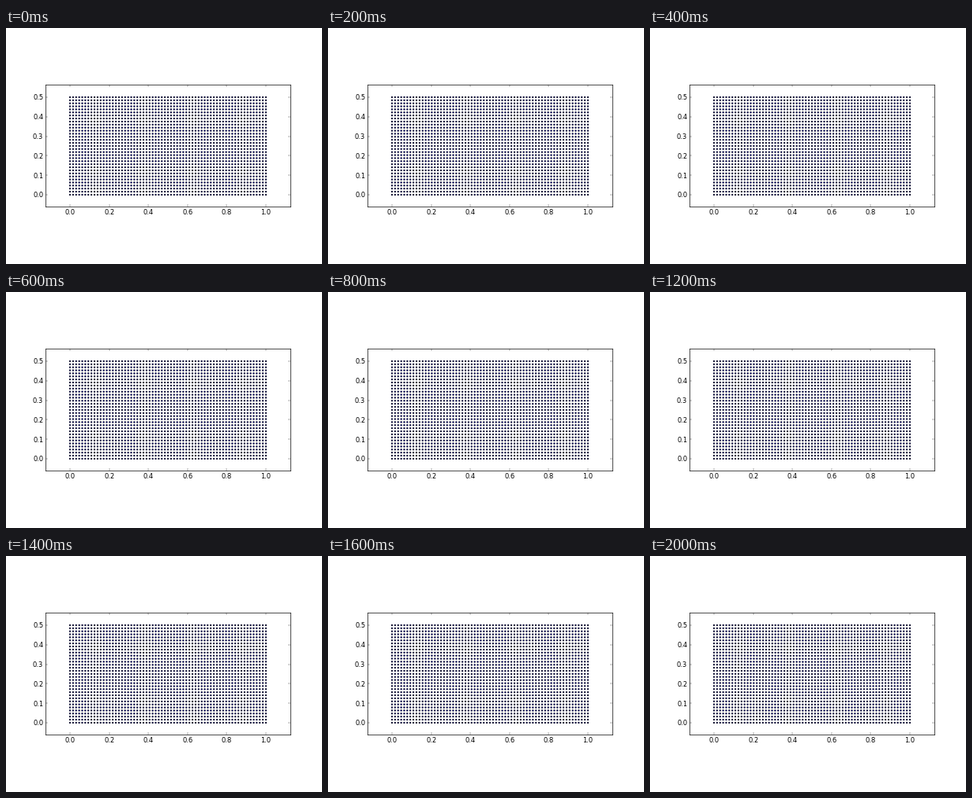
These frames come from a looping animation (400x300 px, 2100 ms). A matplotlib script:

```python
import numpy as np
import matplotlib.pyplot as plt
from matplotlib.animation import FuncAnimation

FRAMES, STEP_MS = 21, 100
NX, NY = 65, 33
DRIFT = 0.0006  # largest displacement over one loop, in data units

plt.rcParams["font.family"] = "DejaVu Sans"
plt.rcParams["font.size"] = 12

fig = plt.figure(figsize=(8, 6), dpi=50, facecolor="white")
# The slight lift makes the half-pixel frame lines round upwards.
ax = fig.add_axes([0.125, 0.1002, 0.775, 0.8])
ax.set_aspect("equal")
ax.set_xlim(-0.125, 1.125)
ax.set_ylim(-0.0625, 0.5625)
ax.set_xticks(np.linspace(0, 1, 6))
ax.set_yticks(np.linspace(0, 0.5, 6))
ax.tick_params(direction="in", top=True, right=True,
               length=4, width=0.5, pad=4)
for spine in ax.spines.values():
    spine.set_linewidth(1)

x0, y0 = np.meshgrid(np.linspace(0, 1, NX), np.linspace(0, 0.5, NY))
x0, y0 = x0.ravel(), y0.ravel()

# Two counter-rotating cells; the outer points slide only along the walls.
u = -np.sin(2 * np.pi * x0) * np.cos(2 * np.pi * y0)
v = np.cos(2 * np.pi * x0) * np.sin(2 * np.pi * y0)

# Per-point line widths keep the dots from snapping to whole pixels.
dots = ax.scatter(x0, y0, s=5, facecolors="blue", edgecolors="black",
                  linewidths=np.ones(x0.size))


def update(i):
    shift = DRIFT * i / (FRAMES - 1)
    dots.set_offsets(np.column_stack([x0 + shift * u, y0 + shift * v]))
    return dots,


anim = FuncAnimation(fig, update, frames=FRAMES, interval=STEP_MS,
                     repeat=True, repeat_delay=0)
plt.show()
```
